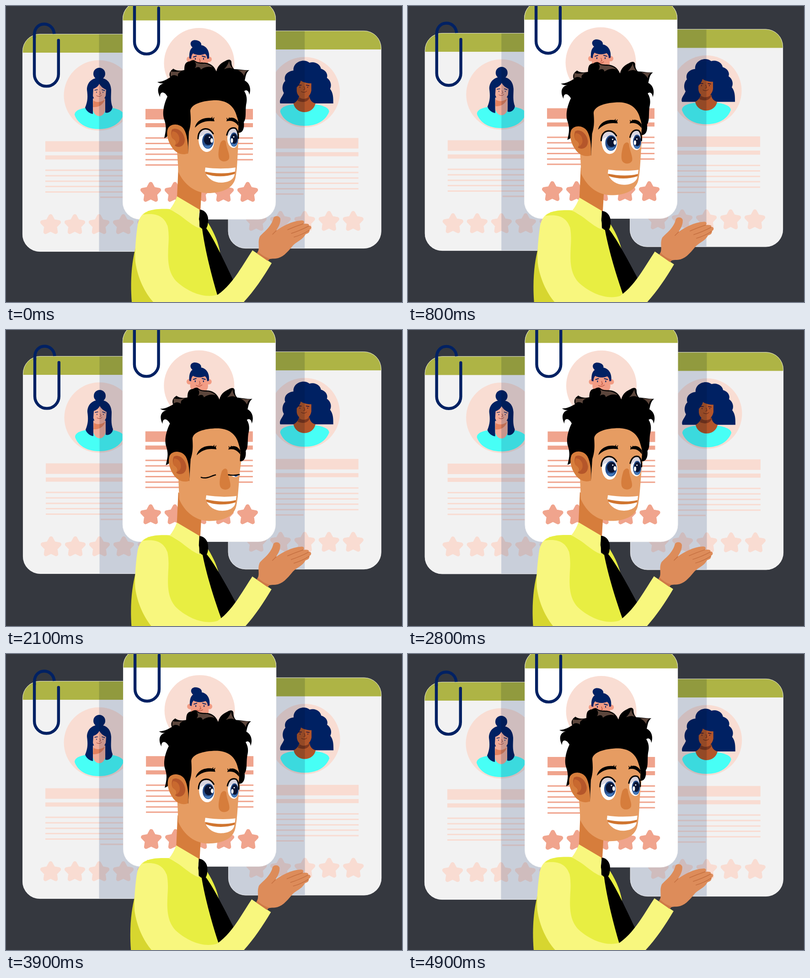
Recreate the animation shown at these times as an HTML page. Size 866 by 647 pixels, loop 5 s.

```html
<!DOCTYPE html>
<html lang="en">
<head>
<meta charset="utf-8">
<title>Choosing a candidate</title>
<style>
html, body { margin: 0; width: 100%; height: 100%; overflow: hidden; background: #35383f; }
svg { display: block; width: 100vw; height: 100vh; }
.shade { fill: #d4dae6; mix-blend-mode: multiply; }
.line { fill: none; stroke-linecap: round; }
</style>
</head>
<body>
<svg viewBox="0 0 866 647">
<defs>
  <clipPath id="sheet"><rect x="36" y="61" width="335" height="476" rx="38"/></clipPath>
  <path id="bust" fill="#47fff6" d="M150 238C150 226 170 222 190 221H217C238 222 257 228 257 238C250 256 232 269 203 269C175 269 156 256 150 238Z"/>

  <g id="longHair">
    <g fill="#002163">
      <circle cx="204" cy="148" r="13"/>
      <path d="M204 157C188 157 177 167 177 183C179 198 179 208 173 222C176 231 184 235 190 236V203H217V233C224 235 232 230 233 221C228 208 230 197 230 183C229 166 219 157 204 157Z"/>
    </g>
    <path fill="#f2ad9a" d="M190 202H217V228C213 245 195 245 190 228Z"/>
    <path fill="#e5825f" d="M191 207C200 212 210 210 216 204C213 216 202 222 190 221Z"/>
    <path fill="#f2ad9a" d="M191 181C197 179 202 175 204 170C208 177 214 181 219 183L218 196C215 204 209 209 204 209C197 209 191 202 190 196Z"/>
    <path class="line" stroke="#002163" stroke-width="1.5" d="M194 184l6-1M210 183l6 2M198 188v1M212 188v1"/>
    <path class="line" stroke="#9c4238" d="M205 187l2 5-3 1M198 196q6 4 11-1"/>
  </g>

  <g id="shortHair">
    <g fill="#f29c84"><circle cx="182" cy="187" r="6"/><circle cx="225" cy="187" r="6"/><path d="M184 170H223V198C221 216 188 216 184 198Z"/></g>
    <path fill="#002163" d="M182 185C181 172 184 164 189 161C181 154 185 145 194 145C203 145 209 150 208 156C219 158 227 168 225 185L221 186C221 180 219 177 216 175C206 179 196 178 190 174C187 177 186 181 186 186Z"/>
    <path class="line" stroke="#002163" stroke-width="2" d="M191 182l6-2M210 180l7 2M195 185v2M213 185v2"/>
    <path class="line" stroke="#b8513d" stroke-width="1.3" d="M204 186l2 6-3 1M197 195q7 4 13-1"/>
  </g>

  <g id="curlyHair" transform="translate(-450 7)">
    <path fill="#002163" d="M600 213C597 205 604 200 608 190C602 180 606 168 611 164C607 152 615 143 629 141C627 124 650 113 664 124C676 120 688 128 689 137C700 140 705 150 702 157C711 163 713 174 709 181C716 190 716 200 716 213Z"/>
    <path fill="#b2552a" d="M629 213C634 210 640 205 641 198H664C665 206 670 211 677 213C675 225 664 232 653 232C642 232 631 225 629 213Z"/>
    <path fill="#7d371f" d="M641 199C648 205 657 204 665 197C663 209 651 213 638 207Z"/>
    <path fill="#b2552a" d="M636 178C641 173 644 168 645 163C650 167 660 169 668 169V185C666 196 659 202 652 202C643 201 637 195 636 186Z"/>
    <path class="line" stroke="#20123a" stroke-width="1.5" d="M640 173l6 0M657 173l6 1M643 177v1M660 177v1"/>
    <path class="line" stroke="#5c2417" d="M652 176l2 6-3 1M646 187q7 4 12-1"/>
  </g>
</defs>

<g id="left"></g>
<g id="right"></g>
<g id="middle"></g>

<g id="body">
  <path fill="#d67d3c" d="M377 350L374 418L425 450L428 395Z"/>
  <path fill="#e8ee42" d="M310 448L359 444L424 484L442 474C455 495 464 515 468 538L472 647H310Z"/>
  <path id="tie" d="M424 445C436 446 443 458 442 468C442 478 440 483 438 486C452 505 474 550 502 610L468 650C455 610 436 540 429 487C420 482 421 471 422 465Z"/>
  <path fill="#d7d62f" d="M284 525C276 555 271 595 275 647H325L300 560Z"/>
  <path fill="#f8f77e" d="M320 448C302 447 292 459 288 478C284 505 281 540 283 560C288 595 304 627 322 647H520C543 622 562 594 581 562L539 534C517 567 496 608 463 631C435 640 400 626 375 604C352 583 354 550 355 525C358 485 354 453 320 448Z"/>
  <path fill="#e8ee42" d="M300 456C308 447 325 442 359 444L364 450L353 480C346 461 330 451 300 456Z"/>
  <path fill="#f8f77e" d="M374 416L423 445L422 466C424 474 422 480 424 486C400 478 380 452 358 445C365 436 370 427 374 416Z"/>
  <path fill="#dd8c5a" d="M549 540C557 530 549 518 555 504C563 494 580 484 585 463C590 456 601 460 600 467C600 478 594 485 591 491C605 481 625 470 645 469C652 468 654 473 650 476C657 475 665 476 662 480C668 479 670 486 664 489C664 496 660 497 655 499C649 511 637 514 628 523C614 540 605 550 590 552C580 553 576 551 573 557Z"/>
  <path fill="#cf7947" d="M551 536C557 543 566 549 577 552L572 557L549 541Z"/>
  <path class="line" stroke="#c57041" stroke-width="1.5" d="M591 491l-8 8M616 489Q632 482 650 476M624 497Q643 491 662 481M630 505Q648 500 663 490"/>
</g>

<g id="head">
  <path fill="#e69c62" d="M402 220C430 198 490 200 507 218C514 245 512 270 508 300C506 330 506 355 502 375C497 401 468 409 442 409C414 409 390 391 377 363L374 315L398 315Z"/>
  <path d="M346 289C349 275 352 265 346 248C341 235 345 215 353 198C345 184 336 188 337 199C329 185 332 172 345 169C338 170 334 168 331 166C343 166 352 160 359 156C355 147 360 141 366 137C372 142 381 142 390 140C390 128 392 122 402 121C406 118 411 117 414 120C420 125 430 123 437 124C449 126 456 133 460 143C463 129 472 124 480 120C486 116 492 116 493 122C493 129 495 134 499 138C510 138 520 141 532 140C524 146 524 156 522 163C532 168 537 180 532 194C531 185 526 182 521 186C528 197 527 207 525 216C523 231 526 246 520 254C522 268 517 278 508 277C507 268 511 258 505 242C500 221 486 207 460 206C430 206 403 215 403 230C405 252 404 261 400 275L398 323C393 307 398 281 387 268C378 257 362 257 358 268L352 286Z"/>
  <g fill="#5c463c">
    <path d="M360 143Q372 145 385 142Q374 146 376 154Q367 148 360 154Z"/>
    <path d="M413 122Q420 127 435 126Q446 128 452 134Q438 130 426 139Q424 130 413 136Q418 129 413 122Z"/>
    <path d="M488 120Q489 130 496 137Q488 133 477 138Q485 130 488 120Z"/>
    <path d="M506 140L528 141Q521 145 521 153Q515 143 506 140Z"/>
  </g>
  <path fill="#d67d3c" d="M398 322C384 328 370 320 363 309C353 295 350 279 354 268C360 256 380 256 389 269C396 280 399 302 398 322Z"/>
  <path fill="#b5562a" d="M363 270C373 264 388 273 391 291C392 306 378 312 369 305C374 299 372 294 364 289C360 283 361 275 363 270Z"/>
  <path fill="#c9692f" d="M364 274C373 274 380 282 379 293C378 299 374 302 370 304C374 298 372 294 364 289C361 284 362 278 364 274Z"/>
  <path d="M413 266C416 250 434 241 454 246L456 252C438 250 426 253 413 266ZM482 252C484 242 501 240 508 254L508 262C501 252 492 249 482 252Z"/>
  <path class="line" stroke="#000" stroke-width="1.3" d="M448 247l3-4M453 249l2-5M484 249l-1-4M488 247l0-3"/>

  <g id="open">
    <path fill="#fff" d="M421 290C421 276 430 269 440 271C451 274 456 286 455 299C453 313 447 319 438 319C428 318 421 306 421 290Z"/>
    <path fill="#d8d5df" d="M421 289C422 274 432 268 441 271C449 273 453 280 454 286C443 277 430 280 421 289Z"/>
    <path fill="#fff" d="M484 290C484 275 491 267 500 268C506 270 509 279 508 294C506 306 502 311 496 310C488 308 484 299 484 290Z"/>
    <path fill="#d8d5df" d="M484 287C485 273 492 266 500 268C506 270 508 276 508 283C500 275 491 277 484 287Z"/>
    <g fill="#264d8b"><ellipse cx="441.500" cy="295" rx="12.500" ry="17"/><ellipse cx="498.500" cy="292" rx="9" ry="15.500"/></g>
    <path fill="#437bbd" d="M433 304Q441 308 450 303Q447 311 441 311Q435 310 433 304ZM492 300Q498 304 505 300Q502 307 498 307Q494 306 492 300Z"/>
    <g fill="#081331"><ellipse cx="442.500" cy="292" rx="10" ry="11.500"/><ellipse cx="499" cy="290" rx="7" ry="11"/></g>
    <g fill="#fff"><ellipse cx="450" cy="294" rx="3" ry="5"/><circle cx="445" cy="287" r="1.500"/><ellipse cx="494" cy="294" rx="2.500" ry="5"/><circle cx="498" cy="286" r="1.500"/></g>
    <path class="line" stroke="#000" stroke-width="3" d="M420 290C420 272 431 267 441 269Q448 271 453 279M483 282C486 268 494 265 501 267Q508 271 508 289"/>
  </g>
  <g id="closed">
    <path fill="#fff" d="M487 307L506 306C504 314 493 313 487 307Z"/>
    <path fill="#2b5797" d="M495 307H505Q503 311 498 311Z"/>
    <path class="line" stroke="#000" stroke-width="2.500" d="M424 314C436 318 446 310 455 308M483 307Q495 309 507 306"/>
  </g>

  <path fill="#d67d3c" d="M469 299C473 292 480 292 481 298C482 311 490 324 488 333C485 341 472 342 467 335C462 327 466 308 469 299Z"/>
  <path fill="#d0752f" d="M436 357L502 354L500 368C485 377 450 376 437 368Z"/>
  <path fill="#fff" d="M436 353C457 356 482 356 502 353L501 362C480 368 455 366 435 362Z"/>
  <path fill="#fff" d="M437 367C455 374 481 374 500 367C499 380 485 386 470 386C455 386 443 378 437 367Z"/>
</g>
</svg>
<script>
const $ = id => document.getElementById(id);

const star = (cx, cy) => 'M' + Array.from({ length: 10 }, (_, i) => {
  const r = i % 2 ? 10 : 19, a = i * Math.PI / 5;
  return (cx + r * Math.sin(a)).toFixed(1) + ' ' + (cy - r * Math.cos(a)).toFixed(1);
}).join('L') + 'Z';

// Every card is laid out where the left one stands and then moved.
function card(id, paper, ink, avatar, shadeX, shortX) {
  const rows = [298, 310, 322, 333.5, 345.5].map(y => `M86 ${61 + y}h235`).join('');
  const stars = [0, 1, 2, 3, 4].map(i => star(97.5 + 53 * i, 478.5)).join('');
  const shade = shadeX ? `<rect class="shade" x="${shadeX}" y="61" width="167.5" height="476"/>` : '';
  $(id).innerHTML = `
    <g clip-path="url(#sheet)">
      <rect x="36" y="61" width="335" height="476" fill="${paper}"/>
      <rect x="36" y="61" width="335" height="41" fill="#aeb445"/>
      <circle cx="203.5" cy="195.5" r="77" fill="#f9ddd3"/>
      <path fill="${ink}" d="M86 295.500h235v23h-235zM86 326.500h235v9h-235z"/>
      <path stroke="${ink}" stroke-width="3" d="${rows}M${shortX} 418h115"/>
      <path fill="${ink}" stroke="${ink}" stroke-width="9" stroke-linejoin="round" d="${stars}"/>
      <use href="#bust"/><use href="#${avatar}"/>
      ${shade}
    </g>
    <rect x="36.400" y="61.400" width="334.200" height="475.200" rx="37.600" fill="none" stroke="#f2f2f2" stroke-width=".8"/>
    <g class="line" stroke="#002163" stroke-width="6.400">
      <path stroke-linecap="butt" d="M105.500 61C103 32 62 32 62 63V70"/>
      <path d="M62 65V149A26.400 26.400 0 0 0 114.800 149V75"/>
    </g>`;
}
card('left', '#f2f2f2', '#f9dcd2', 'longHair', 203.5, 206);
card('right', '#f2f2f2', '#f9dcd2', 'curlyHair', 36, 86);
card('middle', '#fff', '#f0a48d', 'shortHair', 0, 86);

const loop = 5000, times = [0, 400, 1300, 2100, 3500, 4300];
const poses = {
  leftX: [0, .5, 1, 1, .2, 0],       leftY: [0, -1, -3, -4, -2.8, -1],
  midX: [0, -.7, -1, -.2, 1, 1],     midY: [0, -.8, -2.5, -3.5, -2.6, -1],
  rightX: [0, -.5, -.6, 0, .5, .3],  rightY: [0, -1.8, -5.3, -6.8, -3.8, -1.2],
  bodyX: [0, .6, .8, -.3, -1.7, -1.4], bodyY: [0, 1.5, 4, 4.7, 3.5, 1],
  headX: [0, 1.4, 1.6, 1, -.9, -.9], headY: [0, 2.3, 6.4, 8, 6.4, 2.7],
  turn: [0, .1, .85, 1.27, 1.38, .7], tie: [0, -1.8, -3.5, -3.5, -2.5, -.6]
};

// Smooth periodic curve through the key values.
function at(v, t) {
  const n = times.length;
  const time = i => times[(i + n) % n] + Math.floor(i / n) * loop;
  const val = i => v[(i + n) % n];
  const slope = i => (val(i + 1) - val(i - 1)) / (time(i + 1) - time(i - 1));
  let i = n - 1;
  while (times[i] > t) i--;
  const d = time(i + 1) - time(i), u = (t - time(i)) / d, w = 1 - u;
  return w * w * (1 + 2 * u) * val(i) + u * u * (1 + 2 * w) * val(i + 1)
    + d * u * w * (w * slope(i) - u * slope(i + 1));
}

function draw(now) {
  const t = Math.floor(now % loop / 100) * 100;
  const p = {};
  for (const k in poses) p[k] = at(poses[k], t);
  const move = (id, x, y, more = '') => $(id).setAttribute('transform', `translate(${x} ${y})${more}`);
  move('left', p.leftX, p.leftY);
  move('middle', 219 + p.midX, -70.5 + p.midY);
  move('right', 449.7 + p.rightX, -7 + p.rightY);
  move('body', p.bodyX, p.bodyY);
  move('head', p.headX, p.headY, ` rotate(${p.turn} 420 400)`);
  $('tie').setAttribute('transform', `rotate(${p.tie} 431 465)`);
  const blink = t >= 2000 && t < 2200;
  $('open').style.display = blink ? 'none' : '';
  $('closed').style.display = blink ? '' : 'none';
}

const start = performance.now();
function tick() {
  draw(performance.now() - start);
  requestAnimationFrame(tick);
}
tick();
</script>
</body>
</html>
```
